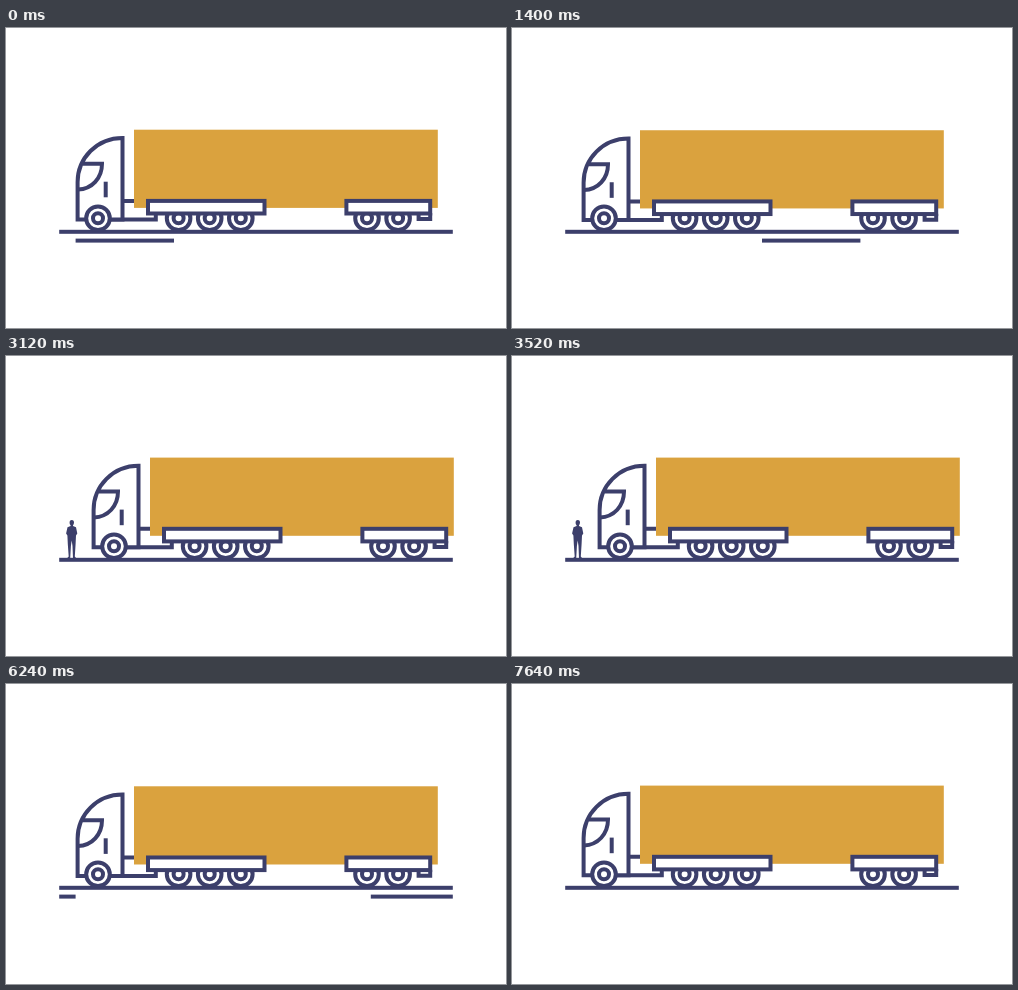
An HTML page with a canvas that plays this animation: 500x300 px, repeating every 7.68 s.

```html
<!DOCTYPE html>
<html lang="en">
<head>
<meta charset="utf-8">
<title>Truck</title>
<style>
  html, body { margin: 0; width: 100%; height: 100%; overflow: hidden; background: #fff; }
  canvas { display: block; width: 500px; height: 300px; }
</style>
</head>
<body>
<canvas id="stage" width="500" height="300"></canvas>
<script>
const ctx = document.getElementById('stage').getContext('2d');
const NAVY = '#3c3f6b', GOLD = '#daa23e', WHITE = '#fff';
const STEP = 40, FRAMES = 192;
const ROAD = { left: 53.2, right: 446.8, y: 203.8 };
const LENGTH = ROAD.right - ROAD.left;
const DASH = LENGTH / 4;
const LAP = 24;         // frames for the dash to cross the road
const SHIFT = 16;       // how far the parked truck stands to the right
const EASE_FRAMES = 12;

const clamp = v => Math.min(1, Math.max(0, v));
const smooth = v => v * v * (3 - 2 * v);

function segment(x1, x2, y) {
  if (x2 <= x1) return;
  ctx.fillRect(x1, y - 2, x2 - x1, 4);
}

function outline(path, fill) {
  const p = new Path2D(path);
  if (fill) { ctx.fillStyle = fill; ctx.fill(p); }
  ctx.stroke(p);
}

function bed(x, w) {
  ctx.fillStyle = WHITE;
  ctx.fillRect(x, 172.8, w, 12.6);
  ctx.strokeRect(x, 172.8, w, 12.6);
}

function wheel(x) {
  ctx.fillStyle = WHITE;
  ctx.beginPath();
  ctx.arc(x, 190.2, 11.8, 0, Math.PI * 2);
  ctx.fill();
  ctx.stroke();
  ctx.beginPath();
  ctx.arc(x, 190.2, 5, 0, Math.PI * 2);
  ctx.stroke();
}

function truck(dx, dy) {
  ctx.save();
  ctx.translate(dx, 0);
  ctx.strokeStyle = NAVY;
  ctx.lineWidth = 4;

  // Cab, coupling and load
  ctx.save();
  ctx.translate(0, dy);
  outline('M116.5 172.8H149.8V191.3H104', WHITE);
  ctx.fillStyle = GOLD;
  ctx.fillRect(128, 101.6, 303.8, 78.2);
  outline('M116.5 109.8V191.3H71.6V154C71.6 130 91 109.8 116.5 109.8Z', WHITE);
  outline('M77 135.6H96C96 150 86 161 72 161.4');
  outline('M99.7 153.6V169.2');
  ctx.restore();

  [92, 172.6, 203.7, 234.8, 361, 392.1].forEach(wheel);

  // Beds cover the tops of the trailer wheels
  ctx.save();
  ctx.translate(0, dy);
  outline('M412.6 185V191H424.2V185', WHITE);
  bed(142, 116.5);
  bed(340.4, 83.8);
  ctx.restore();
  ctx.restore();
}

function person(alpha) {
  if (alpha <= 0) return;
  ctx.globalAlpha = alpha;
  ctx.fillStyle = NAVY;
  ctx.fill(new Path2D(
    'M65.8 164C67.4 164 68.1 165.2 68 166.8C67.9 168 67.5 168.8 67 169.3V170' +
    'L70 171.2L71.3 177.4L70 179.5L69.6 188L68.8 200.6L70.4 202.4H67' +
    'L66.5 190L65.7 184.5L64.9 190L64.2 202.4H60.8L62.7 200.6L61.8 188' +
    'L61.4 179.5L60.1 177.4L61.5 171.2L64.6 170V169.3' +
    'C64 168.8 63.6 168 63.6 166.8C63.5 165.2 64.2 164 65.8 164Z'));
  ctx.globalAlpha = 1;
}

function dash(n) {
  if (n < 0 || n >= 2 * LAP) return;
  const start = (n % LAP) / LAP * LENGTH;
  const end = start + DASH;
  const y = 212.6;
  segment(ROAD.left + start, Math.min(ROAD.left + end, ROAD.right), y);
  if (n < LAP) segment(ROAD.left, ROAD.left + end - LENGTH, y);
}

function bounce(n, length, cycles) {
  if (n <= 0 || n >= length) return 0;
  return 0.35 * (1 - Math.cos(n / length * cycles * Math.PI * 2));
}

function draw(f) {
  ctx.fillStyle = WHITE;
  ctx.fillRect(0, 0, 500, 300);

  const parked = smooth(clamp((f - 60) / EASE_FRAMES)) -
                 smooth(clamp((f - 137) / EASE_FRAMES));
  const second = f >= 137;
  const n = second ? f - 137 : f + 1;

  ctx.fillStyle = NAVY;
  segment(ROAD.left, ROAD.right, ROAD.y);
  dash(n);
  truck(SHIFT * parked, second ? bounce(n, 54, 7) : bounce(n, 49, 6));
  person(parked);
}

const begin = performance.now();
function tick() {
  draw(Math.floor((performance.now() - begin) / STEP) % FRAMES);
  requestAnimationFrame(tick);
}
tick();
</script>
</body>
</html>
```
